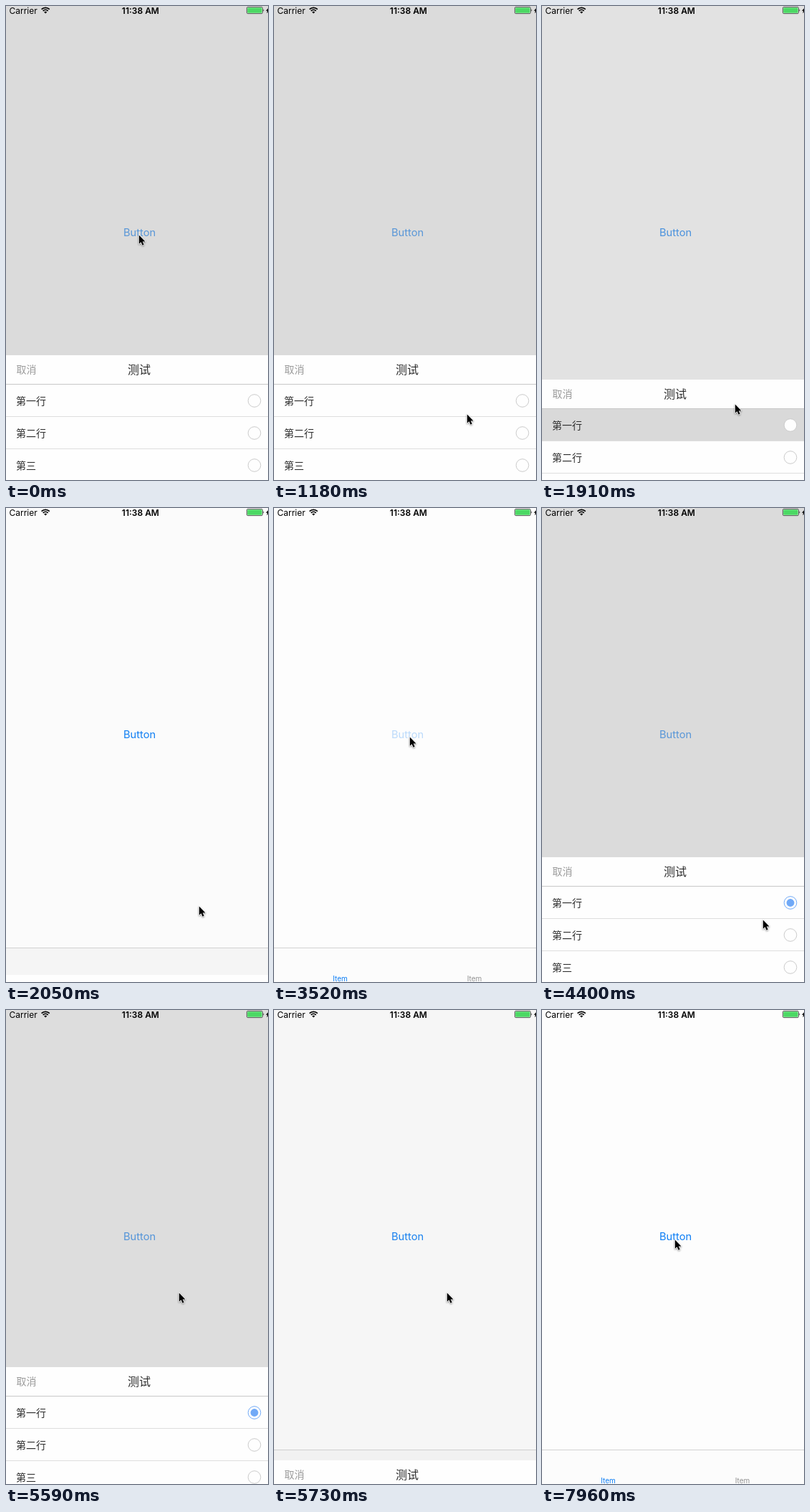
An HTML page for the animation above (8000 ms loop, 366 by 661 pixels).

```html
<!DOCTYPE html>
<html lang="zh">
<head>
<meta charset="utf-8">
<title>Bottom sheet</title>
<style>
  html, body { margin: 0; width: 100%; height: 100%; overflow: hidden; background: #fdfdfd; }
  svg { display: block; width: 366px; height: 661px; }
  text { font-family: Inter, Roboto, "Liberation Sans", sans-serif; }
  #sheet text { font-family: "Noto Sans CJK SC", "Noto Sans CJK", sans-serif; font-size: 14px; fill: #2e2e2e; }
  #sheet .title { font-size: 16px; }
  #sheet .cancel { fill: #9a9a9a; }
  .tab { font-size: 10px; text-anchor: middle; }
  #cursor { filter: drop-shadow(0 1px 1px rgba(0, 0, 0, .4)); }
</style>
</head>
<body>
<svg viewBox="0 0 366 661">
  <rect width="366" height="661" fill="#fdfdfd"/>
  <text id="button" x="186.5" y="320.6" font-size="14.7" text-anchor="middle" fill="#0d7ef5">Button</text>

  <g>
    <rect id="bar" y="613" width="366" height="48"/>
    <rect y="613" width="366" height="1" fill="#d2d2d2"/>
    <text class="tab" x="92.5" y="660" fill="#0d7ef5">Item</text>
    <text class="tab" x="280" y="660" fill="#929292">Item</text>
  </g>

  <rect id="dim" width="366" height="661" fill="#b2b2b2"/>

  <g>
    <text x="4.5" y="10.5" font-size="12">Carrier</text>
    <path d="M49.6 4.6a8 8 0 0 1 11.2 0M51.7 6.9a5 5 0 0 1 7 0" fill="none" stroke="#000" stroke-width="1.7"/>
    <path d="M55.2 10.6l-2-2.1a2.9 2.9 0 0 1 4 0z"/>
    <text x="187.9" y="10.5" font-size="12" font-weight="600" text-anchor="middle">11:38 AM</text>
    <rect x="336.4" y="1.4" width="22" height="9.2" rx="1.5" fill="#fff" stroke="#333" stroke-width=".8"/>
    <rect x="337.2" y="2.2" width="20.4" height="7.6" rx=".8" fill="#4cd964"/>
    <path d="M359.5 4.2q1.8 1.8 0 3.6z"/>
    <path d="M366 3.2l-3 3.6h2l-.6 3.4 1.6-1.6z"/>
  </g>

  <g id="sheet">
    <rect width="366" height="176" fill="#fefefe"/>
    <text class="cancel" x="14.5" y="25.3">取消</text>
    <text class="title" x="186" y="25.8" text-anchor="middle">测试</text>
    <rect y="40" width="366" height="1" fill="#c8c8c8"/>
    <g id="rows"></g>
  </g>

  <g id="cursor">
    <path d="M.8 1.6v12.2l2.8-2.6 2 4.5 2.1-.9-2-4.4h3.8z" stroke="#fff" stroke-width="1.4"
          stroke-linejoin="round" paint-order="stroke"/>
  </g>
</svg>
<script>
const LOOP = 8000;
const STEP = 147.2;   // the picture advances in steps of this length
const LEAD = 20;
const SLIDE = 266;    // time the sheet takes to open or close
const OPENS = 3564, CLOSES = [1836, 5551];
const TOUCH = 3500, RELEASE = 3600;
const PICK = [1600, 2100];

// pointer stops: [ms, x, y]
const stops = [[150, 185, 318], [1180, 269, 568], [1320, 269, 554], [2400, 269, 554],
  [3450, 189, 318], [3800, 189, 318], [4400, 308, 573], [4750, 308, 573], [5390, 241, 393],
  [5900, 241, 393], [6480, 128, 589], [6630, 128, 589], [7070, 73, 641], [7820, 187, 319],
  [7940, 185, 319]];

const $ = id => document.getElementById(id);
const set = (el, attrs) => Object.entries(attrs).forEach(([name, value]) => el.setAttribute(name, value));

function ease(x) {
  const c = Math.min(1, Math.max(0, x));
  return (1 - Math.cos(Math.PI * c)) / 2;
}

function pointer(t) {
  let [, x, y] = stops[0];
  stops.slice(1).forEach(([end, toX, toY], i) => {
    const start = stops[i][0];
    const p = ease((t - start) / (end - start));
    x += (toX - x) * p;
    y += (toY - y) * p;
  });
  return [Math.round(x), Math.round(y)];
}

function openness(t) {
  const slid = start => ease((t - start) / SLIDE);
  return 1 - slid(CLOSES[0]) + slid(OPENS) - slid(CLOSES[1]);
}

$('rows').innerHTML = ['第一行', '第二行', '第三'].map((label, i) => `
  <g transform="translate(0 ${41 + i * 45})">
    <rect class="fill" width="366" height="44" fill="none"/>
    <rect y="44" width="366" height="1" fill="#dedede"/>
    <text x="14" y="27.6">${label}</text>
    <circle class="ring" cx="347" cy="22.5" r="8.8" fill="#fefefe" stroke="#cbcbcb"/>
    <circle class="dot" cx="347" cy="22.5" r="5.4" fill="none"/>
  </g>`).join('');
const [fill, ring, dot] = ['.fill', '.ring', '.dot'].map(part => $('rows').querySelector(part));

function draw(t) {
  const open = openness(t);
  const picked = t > PICK[1];
  const lit = t > PICK[0] && !picked;

  set($('sheet'), { transform: `translate(0 ${Math.round(661 - 174 * open)})` });
  set($('dim'), { opacity: 0.46 * open });
  set($('bar'), { fill: open > 0.01 ? '#f7f7f7' : '#fcfcfc' });
  set($('button'), { opacity: t < TOUCH ? 1 : 0.27 + 0.73 * ease((t - RELEASE) / 150) });

  set(fill, { fill: lit ? '#d9d9d9' : 'none' });
  set(ring, { stroke: picked ? '#70a9f7' : '#cbcbcb' });
  set(dot, { fill: picked ? '#70a9f7' : 'none' });

  set($('cursor'), { transform: `translate(${pointer(t)})` });
}

function tick() {
  const t = performance.now() % LOOP;
  draw(Math.floor((t + LEAD) / STEP) * STEP);
  requestAnimationFrame(tick);
}
tick();
</script>
</body>
</html>
```
